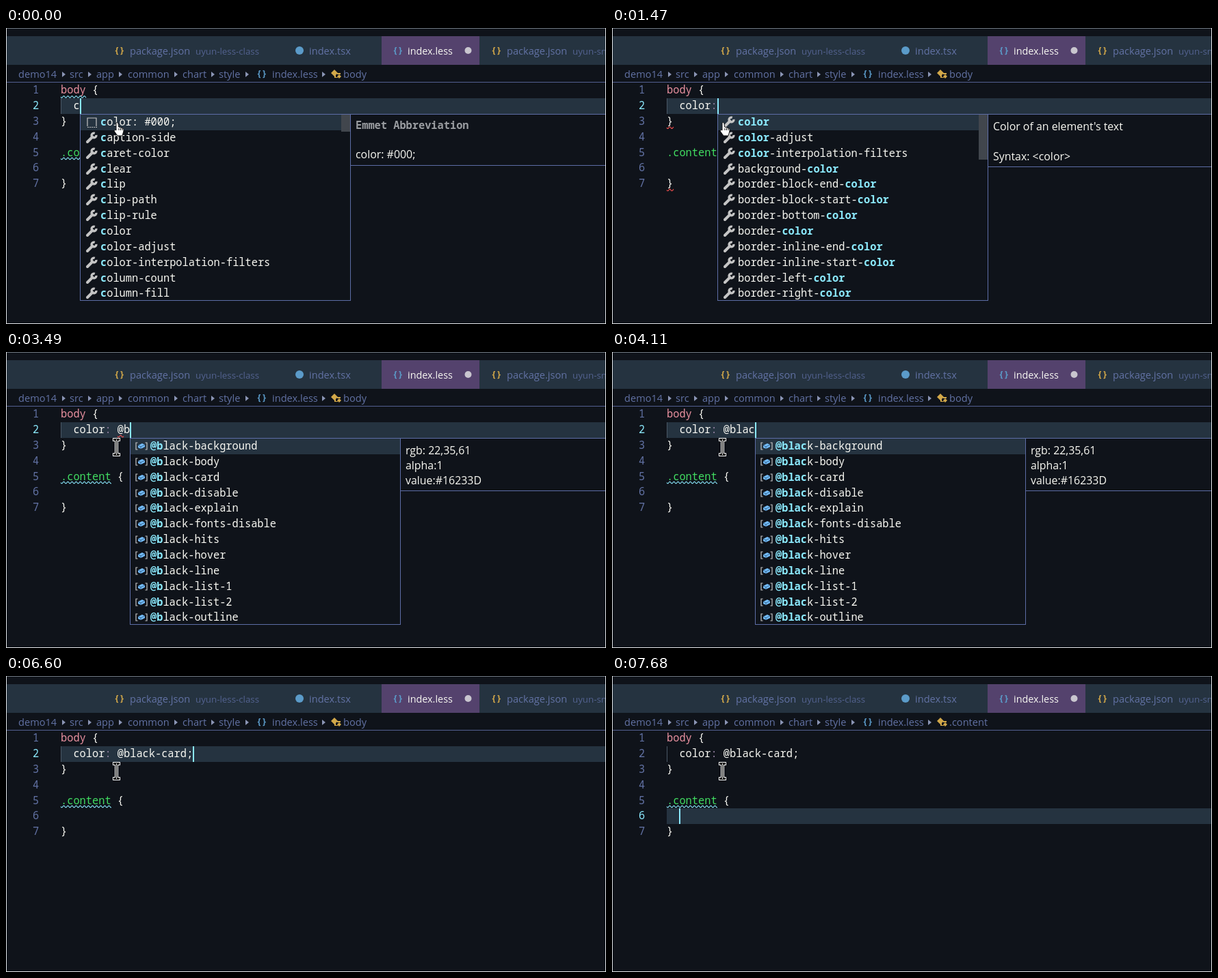
An HTML page with a canvas that plays this animation: 877 by 434 pixels, repeating every 8000 ms.

```html
<!DOCTYPE html>
<html lang="en">
<head>
<meta charset="utf-8">
<title>Editor completion</title>
<style>
html, body { margin: 0; width: 100%; height: 100%; overflow: hidden; background: #0f131a; }
canvas { display: block; width: 877px; height: 434px; }
</style>
</head>
<body>
<canvas id="stage" width="877" height="434"></canvas>
<script>
const ctx = document.getElementById('stage').getContext('2d');
const W = 877, H = 434, LOOP = 8000;
const CHAR = 9.2, LINE = 22.85, LEFT = 80, TOP = 80, POP_W = 396, POP_Y = 126;
const MONO = '"Noto Sans Mono", monospace', UI = '"Open Sans", sans-serif';
const C = {
  bg: '#0f131a', bar: '#253340', tab: '#54426d', dim: '#6272a4', text: '#f8f8f2',
  cyan: '#8be9fd', green: '#41dc61', pink: '#e8909f', red: '#f4504f', border: '#5d6da6',
  yellow: '#d2a849', blue: '#5b9bc9', grey: '#c5c5c5'
};

const LISTS = {
  abbr: ['color: #000;', 'caption-side', 'caret-color', 'clear', 'clip', 'clip-path', 'clip-rule', 'color',
    'color-adjust', 'color-interpolation-filters', 'column-count', 'column-fill'],
  column: ['color', 'color-adjust', 'color-interpolation-filters',
    ...['count', 'fill', 'gap', 'rule', 'rule-color', 'rule-style', 'rule-width', 'span', 'width'].map(s => 'column-' + s)],
  color: ['color', 'color-adjust', 'color-interpolation-filters', 'background-color',
    ...['block-end-', 'block-start-', 'bottom-', '', 'inline-end-', 'inline-start-', 'left-', 'right-']
      .map(s => `border-${s}color`)],
  vars: [...['divide-line', 'gray-background', 'gray-chatroom-bg', 'gray-explain', 'gray-fonts-disable',
    'gray-heading', 'gray-hits', 'gray-line', 'gray-subtitle'].map(s => '@app-' + s),
    '@black-background', '@black-body', '@black-card'],
  black: ['background', 'body', 'card', 'disable', 'explain', 'fonts-disable', 'hits', 'hover', 'line',
    'list-1', 'list-2', 'outline'].map(s => '@black-' + s)
};
const SCROLL = { abbr: 25, column: 45, color: 66, vars: 25, black: 0 };

const rgb = (r, g, b) => {
  const hex = [r, g, b].map(v => v.toString(16).padStart(2, '0')).join('').toUpperCase();
  return [`rgb: ${r},${g},${b}`, 'alpha:1', 'value:#' + hex];
};
const ABOUT = ["Color of an element's text", '', 'Syntax: <color>'];
const SHADES = [rgb(22, 35, 61), rgb(185, 204, 225), rgb(31, 48, 83)];
const pop = (list, col, query, info, sel = 0) => ({ list, col, query, info, sel });
const abbr = pop('abbr', 3, 'c', null);

// Each step changes part of the editor state from its time on.
const STEPS = [
  [0, { line: 2, col: 3, code: 'c', on: true, hand: true, pop: abbr, warnBody: true, warnRule: true,
    errBrace: false, errAt: false, boxes: null, symbol: 'body' }],
  [70, { code: 'co', col: 4 }],
  [150, { pop: pop('column', 4, 'co', ABOUT) }],
  [230, { code: 'col', col: 5, pop: pop('column', 5, 'col', ABOUT) }],
  [300, { warnBody: false, warnRule: false, errBrace: true }],
  [380, { code: 'colo', col: 6 }],
  [460, { pop: pop('color', 6, 'colo', ABOUT) }],
  [530, { code: 'color', col: 7 }],
  [610, { pop: pop('color', 7, 'color', ABOUT) }],
  [1070, { on: false }],
  [1470, { code: 'color:', col: 8, on: true, pop: pop('color', 8, 'color', ABOUT) }],
  [1550, { pop: null, hand: false }],
  [1760, { code: 'color: ', col: 9 }],
  [2160, { code: 'color: @', col: 10 }],
  [2310, { pop: pop('vars', 10, '@', rgb(230, 230, 230)) }],
  [2630, { errBrace: false, warnRule: true, errAt: true }],
  [2710, { on: false }],
  [3170, { on: true }],
  [3400, { code: 'color: @b', col: 11 }],
  [3490, { pop: pop('black', 11, '@b', SHADES[0]) }],
  [3870, { code: 'color: @bl', col: 12, errAt: false, pop: pop('black', 12, '@bl', SHADES[0]) }],
  [3950, { code: 'color: @bla', col: 13, pop: pop('black', 13, '@bla', SHADES[0]) }],
  [4030, { code: 'color: @blac', col: 14 }],
  [4110, { pop: pop('black', 14, '@blac', SHADES[0]) }],
  [4580, { on: false }],
  [4810, { pop: pop('black', 14, '@blac', SHADES[1], 1) }],
  [4960, { pop: pop('black', 14, '@blac', SHADES[2], 2) }],
  [5040, { on: true }],
  [5520, { on: false }],
  [5740, { on: true, code: 'color: @black-card', col: 20, pop: null }],
  [6200, { on: false }],
  [6600, { on: true, code: 'color: @black-card;', col: 21 }],
  [7070, { on: false }],
  [7140, { on: true, line: 3, col: 1 }],
  [7210, { boxes: [[1, 5], [3, 0]] }],
  [7300, { line: 4, col: 0 }],
  [7370, { boxes: null }],
  [7450, { line: 5, col: 10 }],
  [7530, { boxes: [[5, 9], [7, 0]] }],
  [7600, { line: 6, col: 2, boxes: null }],
  [7680, { symbol: '.content' }]
];

function stateAt(t) {
  const state = {};
  for (const [at, change] of STEPS) if (at <= t) Object.assign(state, change);
  return state;
}

const colX = col => LEFT + col * CHAR;
const lineY = n => TOP + (n - 1) * LINE;

function rect(x, y, w, h, color) {
  ctx.fillStyle = color;
  ctx.fillRect(Math.round(x), Math.round(y), Math.round(w), Math.round(h));
}
function frame(x, y, w, h, color) {
  ctx.strokeStyle = color;
  ctx.lineWidth = 1;
  ctx.strokeRect(Math.round(x) + 0.5, Math.round(y) + 0.5, Math.round(w), Math.round(h));
}
function disc(x, y, r, color) {
  ctx.fillStyle = color;
  ctx.beginPath();
  ctx.arc(x, y, r, 0, Math.PI * 2);
  ctx.fill();
}
function poly(points, color) {
  ctx.fillStyle = color;
  ctx.beginPath();
  points.forEach(([x, y]) => ctx.lineTo(x, y));
  ctx.closePath();
  ctx.fill();
}
function write(text, x, y, color, font) {
  ctx.font = font;
  ctx.fillStyle = color;
  ctx.fillText(text, x, y);
}
const ui = (text, x, mid, color, size = 14.6) => write(text, x, mid + 5, color, `${size}px ${UI}`);
const mono = (text, x, mid, color, weight = 500) => write(text, x, mid + 5, color, `${weight} 15.33px ${MONO}`);
const braces = (x, mid, color) => write('{}', x, mid + 4, color, `bold 13px ${MONO}`);

function squiggle(x1, x2, y, color) {
  ctx.strokeStyle = color;
  ctx.lineWidth = 1.1;
  ctx.beginPath();
  for (let x = x1; x <= x2; x++) ctx.lineTo(x, y + 1.4 * Math.sin((x - x1) * Math.PI / 3));
  ctx.stroke();
}

function drawHeader(symbol) {
  write('({}{({  {}({){ }{  {}({}', 4, -1, '#c9ced4', `12px ${MONO}`);
  write('(      ,  {', 518, -1, '#8b939c', `12px ${MONO}`);
  rect(0, 12, W, 42, C.bar);
  rect(549, 12, 143, 42, C.tab);
  braces(158, 33, C.yellow);
  ui('package.json', 181, 34, C.dim);
  ui('uyun-less-class', 277, 34, '#53628f', 13.3);
  disc(429, 33, 6, C.blue);
  ui('index.tsx', 443, 34, C.dim);
  braces(565, 33, C.blue);
  ui('index.less', 587, 34, C.text, 14.4);
  disc(675.5, 33, 5, '#c9c6cf');
  braces(709, 33, C.yellow);
  ui('package.json', 732, 34, C.dim);
  ui('uyun-snippet', 828, 34, '#53628f', 13.3);

  const crumbs = [['demo14', 18], ['src', 93], ['app', 132], ['common', 178], ['chart', 258],
    ['style', 311], ['index.less', 389], [symbol, 493]];
  for (const [text, x] of crumbs) ui(text, x, 68, C.dim);
  for (const x of [82, 120, 165, 246, 300, 350, 462]) poly([[x, 64], [x + 5, 68], [x, 72]], '#8b95b5');
  braces(366, 67, C.blue);
  poly([[475, 66], [480, 61], [485, 66], [480, 71]], C.yellow);
  rect(484, 66, 5, 2, C.yellow);
  poly([[484, 71], [487, 68], [490, 71], [487, 74]], C.yellow);
  rect(480, 69, 2, 4, C.yellow);
  rect(480, 72, 5, 1, C.yellow);
  rect(0, 79, W, 1, '#535f91');
}

function drawCode(s) {
  const mid = n => lineY(n) + 11.2;
  rect(LEFT, lineY(s.line), W, LINE, C.bar);
  rect(LEFT, lineY(2), 1, LINE, '#4a5866');
  for (let n = 1; n <= 7; n++) mono(n, 39, mid(n), n === s.line ? C.cyan : C.dim);

  mono('body', LEFT, mid(1), C.pink);
  mono('{', colX(5), mid(1), C.text);
  const [name, value] = s.code.split(':');
  mono(name, colX(2), mid(2), C.text);
  if (value !== undefined) {
    mono(':', colX(7), mid(2), '#9a86a8');
    mono(value, colX(8), mid(2), C.text);
  }
  mono('}', LEFT, mid(3), C.text);
  mono('.content', LEFT, mid(5), C.green);
  mono('{', colX(9), mid(5), C.text);
  mono('}', LEFT, mid(7), C.text);

  if (s.warnBody) squiggle(LEFT, 117, 101, C.cyan);
  if (s.warnRule) squiggle(LEFT, 154, 191.5, C.cyan);
  if (s.errBrace) for (const n of [3, 7]) squiggle(LEFT, 90, lineY(n) + 20.5, C.red);
  if (s.errAt) squiggle(163, 172, 123.5, C.red);
  if (s.boxes) for (const [n, col] of s.boxes) frame(colX(col), lineY(n) + 1, CHAR, LINE - 2, '#7c8084');
  if (s.on) rect(colX(s.col), lineY(s.line), 2, LINE, C.cyan);
}

function wrench(x, y) {
  ctx.strokeStyle = C.grey;
  ctx.lineCap = 'round';
  ctx.lineWidth = 4;
  ctx.beginPath();
  ctx.moveTo(x - 6, y + 6);
  ctx.lineTo(x + 1.5, y - 1.5);
  ctx.stroke();
  ctx.lineCap = 'butt';
  ctx.lineWidth = 3.4;
  ctx.beginPath();
  ctx.arc(x + 3.5, y - 3.5, 3.4, -0.15, Math.PI * 1.62);
  ctx.stroke();
}
function snippet(x, y) {
  ctx.strokeStyle = C.grey;
  ctx.lineWidth = 1.2;
  ctx.beginPath();
  ctx.moveTo(x - 6, y + 6);
  ctx.lineTo(x - 6, y - 6);
  ctx.lineTo(x + 7, y - 6);
  ctx.lineTo(x + 7, y + 6);
  ctx.stroke();
  for (let i = -6; i < 8; i += 3) rect(x + i, y + 7, 2, 1, C.grey);
}
function variable(x, y) {
  ctx.strokeStyle = C.grey;
  ctx.lineWidth = 1.2;
  for (const side of [-1, 1]) {
    ctx.beginPath();
    ctx.moveTo(x + side * 5.5, y - 5);
    ctx.lineTo(x + side * 8, y - 5);
    ctx.lineTo(x + side * 8, y + 5);
    ctx.lineTo(x + side * 5.5, y + 5);
    ctx.stroke();
  }
  poly([[x - 5, y - 1], [x + 1, y - 4], [x + 5, y - 2], [x + 5, y + 1], [x - 1, y + 4], [x - 5, y + 2]], '#75beff');
  ctx.strokeStyle = '#27506f';
  ctx.lineWidth = 0.8;
  ctx.beginPath();
  ctx.moveTo(x - 5, y - 1);
  ctx.lineTo(x - 1, y + 0.8);
  ctx.lineTo(x + 5, y - 2);
  ctx.moveTo(x - 1, y + 0.8);
  ctx.lineTo(x - 1, y + 4);
  ctx.stroke();
}

function drawPopup({ list, col, query, info, sel }) {
  const x = Math.round(colX(col)), right = x + POP_W - 1;
  rect(x, POP_Y, POP_W, 274, C.bg);
  rect(x, POP_Y + 1 + sel * LINE, POP_W, LINE, C.bar);
  LISTS[list].forEach((item, i) => {
    const mid = 138 + i * LINE, tx = x + 30, at = item.indexOf(query);
    const icon = item[0] === '@' ? variable : item.includes(':') ? snippet : wrench;
    icon(x + 17, Math.round(mid));
    const end = at + query.length;
    mono(item.slice(0, at), tx, mid, C.text);
    mono(query, tx + at * CHAR, mid, C.cyan, 700);
    mono(item.slice(end), tx + end * CHAR, mid, C.text);
  });
  if (SCROLL[list]) rect(right - 13, POP_Y + 1, 13, SCROLL[list], '#41464d');
  frame(x, POP_Y, POP_W - 1, 273, C.border);

  const h = info ? 77 : 75;
  rect(right, POP_Y, W, h, C.bg);
  frame(right, POP_Y, W, h, C.border);
  if (info) {
    info.forEach((text, i) => ui(text, right + 8, 144.5 + i * 22, C.text, 15.9));
  } else {
    mono('Emmet Abbreviation', right + 8, 143, '#9a9da1', 600);
    ui('color: #000;', right + 8, 185.5, C.text, 15.9);
  }
}

function drawHand(x, y) {
  ctx.beginPath();
  ctx.moveTo(x + 3, y + 1);
  ctx.quadraticCurveTo(x + 5, y - 1, x + 6, y + 2);
  ctx.lineTo(x + 6.5, y + 7);
  ctx.lineTo(x + 13, y + 9);
  ctx.quadraticCurveTo(x + 14.5, y + 10, x + 14, y + 13);
  ctx.lineTo(x + 12, y + 20);
  ctx.lineTo(x + 5, y + 20);
  ctx.lineTo(x, y + 13);
  ctx.quadraticCurveTo(x + 1, y + 10, x + 3, y + 12);
  ctx.closePath();
  ctx.fillStyle = '#fff';
  ctx.strokeStyle = '#111';
  ctx.lineWidth = 1;
  ctx.fill();
  ctx.stroke();
  for (const dx of [7, 9.5, 12]) {
    ctx.beginPath();
    ctx.moveTo(x + dx, y + 9);
    ctx.lineTo(x + dx, y + 12);
    ctx.stroke();
  }
}
function drawBeam(x, y) {
  const parts = [[-4, 0, 9, 3], [-1, 0, 3, 25], [-4, 22, 9, 3]];
  for (const [dx, dy, w, h] of parts) rect(x + dx - 1, y + dy - 1, w + 2, h + 2, '#fff');
  for (const [dx, dy, w, h] of parts) rect(x + dx, y + dy, w, h, '#000');
  rect(x, y + 1, 1, 23, '#fff');
}

function draw(now) {
  const s = stateAt(now % LOOP);
  rect(0, 0, W, H, C.bg);
  drawHeader(s.symbol);
  drawCode(s);
  if (s.pop) drawPopup(s.pop);
  if (s.hand) drawHand(158, 138);
  else drawBeam(161, 127);
  frame(0, 0, W - 1, H - 1, '#e4e6e8');
  rect(1, 0, W - 2, 1, '#6f777f');
}

const start = performance.now();
function tick() {
  draw(performance.now() - start);
  requestAnimationFrame(tick);
}
tick();
</script>
</body>
</html>
```
